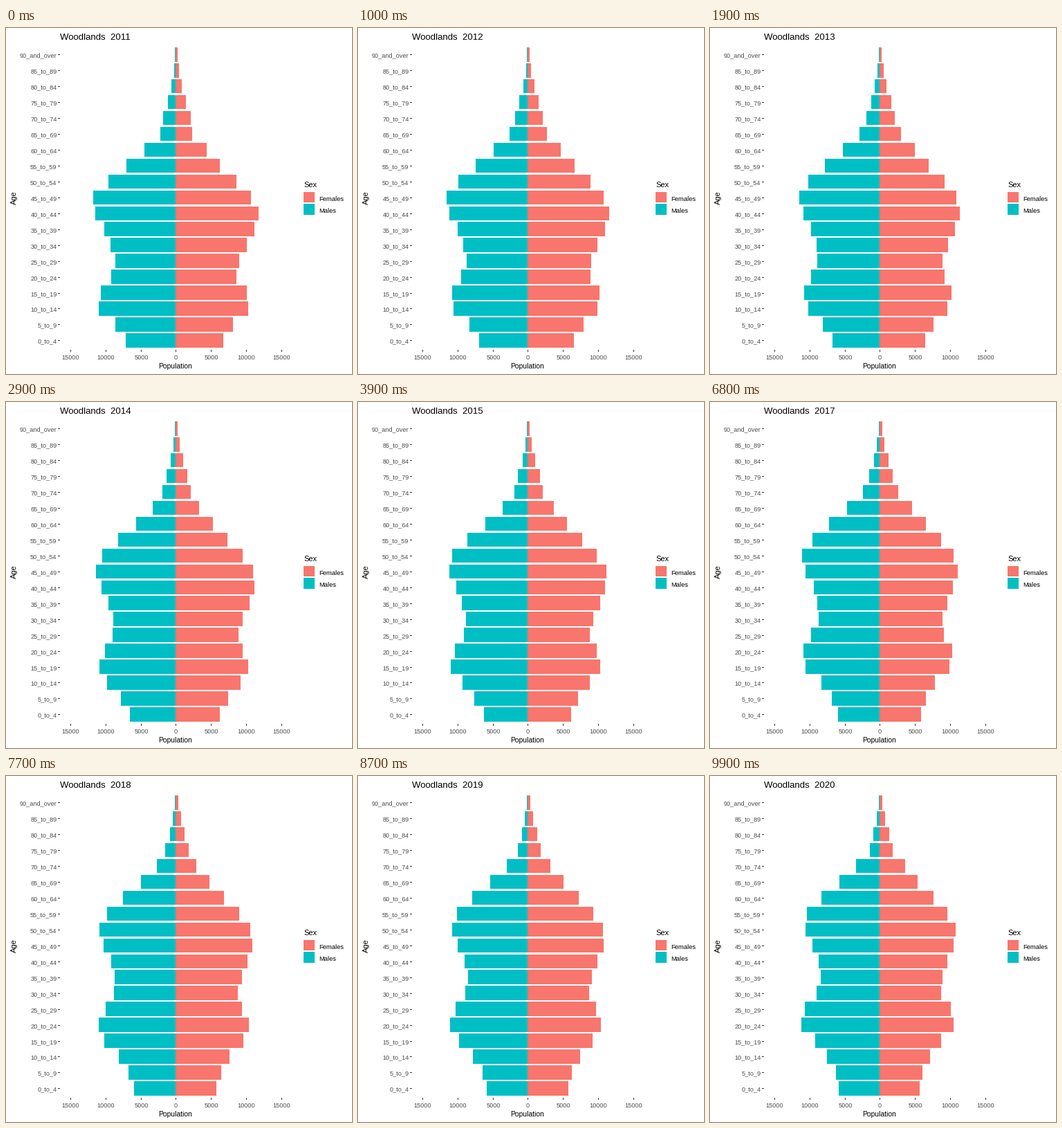
These frames come from a looping animation (500x500 px, 10 s). A matplotlib script:

```python
import numpy as np
import matplotlib.pyplot as plt
from matplotlib.animation import FuncAnimation
from matplotlib.patches import Rectangle

plt.rcParams["font.family"] = "Liberation Sans"

SIZE, DPI = 500, 100
FRAMES, STEPS_PER_YEAR = 100, 11
FIRST_YEAR, SPAN = 2011, 9
PINK, TEAL, TICK, LABEL = "#F8766D", "#00BFC4", "#333333", "#4D4D4D"
ZERO, PX_PER_5000 = 245.4, 50.85
ROW_TOP, ROW_STEP, ROW_HEIGHT = 28.02, 22.95, 20.55

AGES = [f"{a}_to_{a + 4}" for a in range(0, 90, 5)] + ["90_and_over"]
ROWS = np.arange(len(AGES))

# Bar length in pixels of each five-year cohort in the first year,
# youngest first; the first two cohorts are not born yet.
COHORTS = np.arange(-2, len(AGES))
MALES = [59, 60, 72, 87, 111, 108, 93, 87, 94, 103, 116,
         119, 97, 71, 45, 22, 18, 11, 6, 2, 1]
FEMALES = [58, 60, 69, 83, 105, 103, 88, 92, 103, 114, 120,
           109, 88, 64, 45, 24, 22, 15, 9, 5, 3]

# Share of a cohort left after the whole span, at a few age rows.
KEPT_ROWS = [0, 5, 8, 12, 14, 18]
MALES_KEPT = [1, 1.03, 0.92, 0.92, 0.84, 0.2]
FEMALES_KEPT = [1, 1.03, 0.93, 0.94, 0.9, 0.48]

fig = plt.figure(figsize=(SIZE / DPI, SIZE / DPI), dpi=DPI, facecolor="white")
ax = fig.add_axes([0, 0, 1, 1])
ax.set(xlim=(0, SIZE), ylim=(SIZE, 0))
ax.axis("off")


def text(x, y, s, px, color="black", ha="left", va="baseline", **kw):
    return ax.text(x, y, s, fontsize=px * 72 / DPI, color=color, ha=ha, va=va, **kw)


def box(x, y, w, h, color):
    """Rectangle with all edges snapped to whole pixels."""
    left, top = round(x), round(y)
    return ax.add_patch(Rectangle((left, top), round(x + w) - left, round(y + h) - top,
                                  fc=color, lw=0, antialiased=False))


def row_y(row):
    return ROW_TOP + (len(AGES) - 1 - row) * ROW_STEP


def bars(color):
    return [box(ZERO, row_y(r), 0, ROW_HEIGHT, color) for r in ROWS]


def lengths(cohorts, kept, years):
    """Cohorts move up one row every five years and shrink with age."""
    moved = np.interp(ROWS - years / 5, COHORTS, cohorts)
    left = np.interp(ROWS, KEPT_ROWS, kept) ** (years / SPAN)
    return np.maximum(1, np.rint(moved * left))


male_bars, female_bars = bars(TEAL), bars(PINK)

for row, age in enumerate(AGES):
    y = round(row_y(row) + ROW_HEIGHT / 2)
    box(75, y, 3, 1, TICK)
    text(73.5, y + 4, age, 9.2, LABEL, "right")

for k in range(-3, 4):
    x = round(ZERO + k * PX_PER_5000)
    box(x, 465, 1, 3, TICK)
    text(x + 0.5, 479, str(abs(k) * 5000), 9.2, LABEL, "center")

title = text(78, 17, "", 13.2)
text(244.5, 492.5, "Population", 10.4, ha="center")
text(12, 245.5, "Age", 11, ha="center", va="center", rotation=90)

text(430, 230, "Sex", 11)
for i, (name, color) in enumerate([("Females", PINK), ("Males", TEAL)]):
    y = 236.6 + 17.28 * i
    box(430, y, 16, 15.7, color)
    text(452.5, round(y) + 13, name, 9.4)


def update(frame):
    years = frame / STEPS_PER_YEAR
    zero = round(ZERO)
    for bar, n in zip(male_bars, lengths(MALES, MALES_KEPT, years)):
        bar.set_x(zero - n)
        bar.set_width(n)
    for bar, n in zip(female_bars, lengths(FEMALES, FEMALES_KEPT, years)):
        bar.set_width(n)
    title.set_text(f"Woodlands  {round(FIRST_YEAR + years)}")
    return [*male_bars, *female_bars, title]


anim = FuncAnimation(fig, update, frames=FRAMES, interval=100, repeat=True,
                     repeat_delay=0, blit=False)
plt.show()
```
